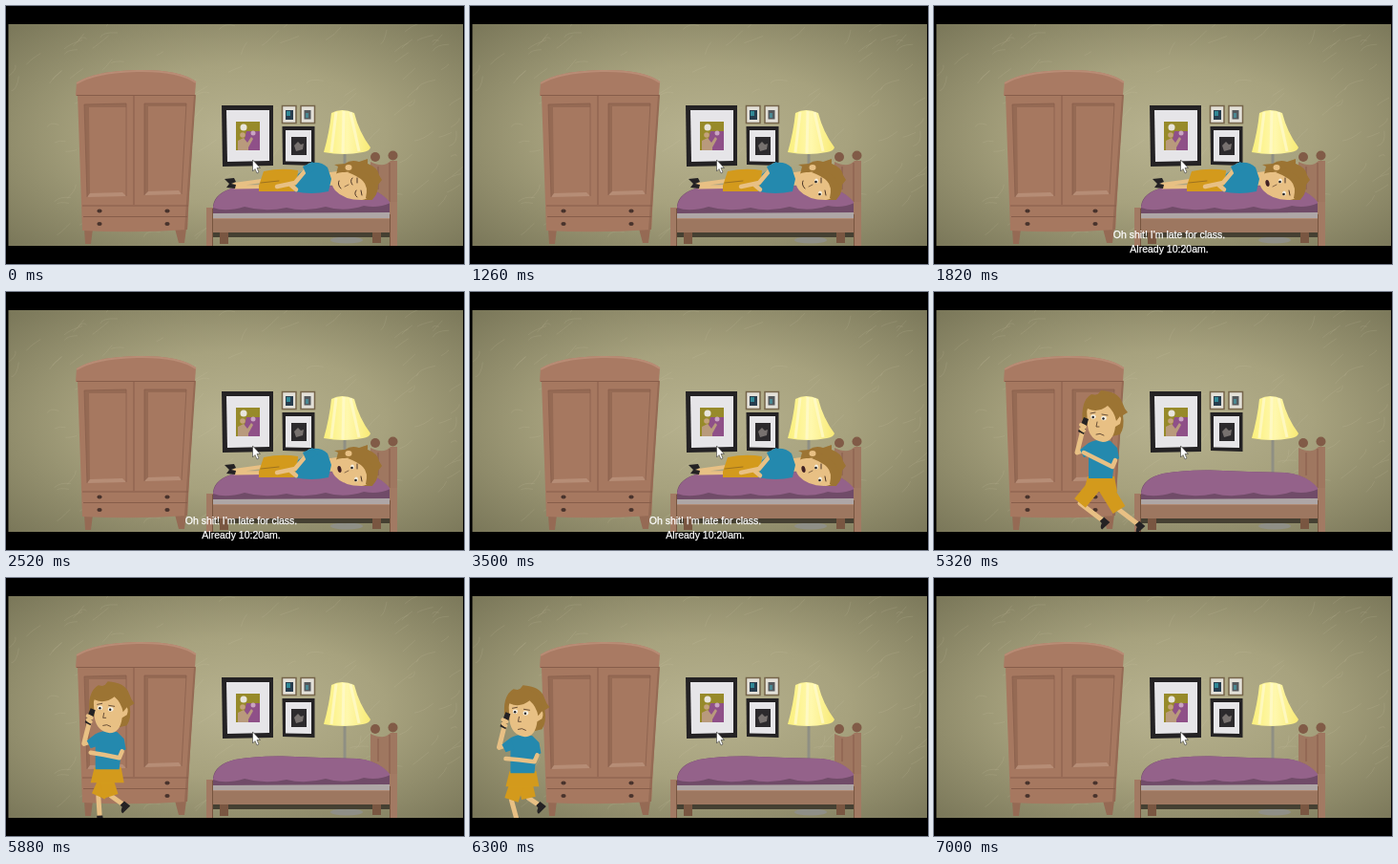
Recreate the animation shown at these times as an HTML page. Size 480 by 270 pixels, loop 7140 ms.

```html
<!DOCTYPE html>
<html lang="en">
<head>
<meta charset="utf-8">
<title>Late for class</title>
<style>
html, body { margin: 0; width: 100%; height: 100%; overflow: hidden; background: #000; }
svg { display: block; width: 100vw; height: 100vh; }
text { font: 10.5px "Liberation Sans", Arial, sans-serif; fill: #fff; stroke: #fff; stroke-width: .25; text-anchor: middle; }
.skin { fill: #e8c084; }
.hair { fill: #9c7433; }
.shirt { fill: #2489ae; }
.shorts { fill: #d39a1c; }
.ink { fill: #242224; }
.line { fill: none; stroke: #4b3527; stroke-width: 1; stroke-linecap: round; }
.limb { fill: none; stroke: #e8c084; stroke-linecap: round; stroke-linejoin: round; }
.wood { fill: #a67860; }
.groove { fill: none; stroke: #875d4a; stroke-width: 1; }
.shade { fill: #956a54; }
.bevel { fill: #b68d76; }
</style>
</head>
<body>
<svg viewBox="0 0 480 270">
  <defs>
    <radialGradient id="wall" cx=".51" cy=".5" r=".7">
      <stop offset="0" stop-color="#b7b28f"/>
      <stop offset=".45" stop-color="#a7a27e"/>
      <stop offset="1" stop-color="#7b785a"/>
    </radialGradient>
    <linearGradient id="glow" x1="0" x2="1">
      <stop offset="0" stop-color="#fbf07c"/>
      <stop offset=".5" stop-color="#fff8ad"/>
      <stop offset="1" stop-color="#f8ea76"/>
    </linearGradient>
    <clipPath id="view"><rect x="2.500" y="19" width="476.500" height="232"/></clipPath>
  </defs>
  <rect width="480" height="270"/>
  <g clip-path="url(#view)">
    <rect x="2" y="19" width="478" height="233" fill="url(#wall)"/>
    <g id="scratches" fill="none" stroke="#d4cfae" opacity=".13"></g>

    <!-- wardrobe -->
    <path class="shade" d="M82 233H91L89 249H83ZM177 233H189L187 248H181Z"/>
    <path class="wood" d="M75 93H198L190 234Q136 238 80 235Z"/>
    <path class="shade" d="M197 93H199L191 211L190 234H187Z"/>
    <path d="M73 94L74 80Q94 68 137 67Q181 66 199 79L198 94Z" fill="#a97a63"/>
    <path d="M74 81Q94 69 137 68Q181 67 199 80" fill="none" stroke="#b98c75" stroke-width="2"/>
    <path class="groove" d="M74 93.500H198M134 94V208M80 209H191M81 220.500H190"/>
    <path class="shade" d="M82 103L126 102V106H87L88 197L85 200ZM145 102L189 102V105H149V196L145 198Z"/>
    <path class="bevel" d="M85 200L88 196L122 195L126 199ZM145 198L149 194L181 193L184 197Z"/>
    <path class="groove" d="M85 200L82 103L126 102V199M145 198V102H189L184 197" stroke-opacity=".7"/>
    <g fill="#48332c">
      <ellipse cx="98" cy="214.500" rx="2.600" ry="2"/><ellipse cx="169" cy="214.500" rx="2.600" ry="2"/>
      <ellipse cx="98" cy="228" rx="2.600" ry="2"/><ellipse cx="169" cy="228" rx="2.600" ry="2"/>
    </g>

    <!-- framed pictures -->
    <path class="ink" d="M226 104H280V167L227 168Z"/>
    <path d="M231 109H276V162L232 163Z" fill="#e6e5e8"/>
    <rect x="241" y="121" width="25" height="30" fill="#978a2a"/>
    <path d="M252 131H266V151H247Z" fill="#8f5088"/>
    <path d="M243 151V141L249 138L253 143L257 137L259 139L254 148V151Z" fill="#b99a7c"/>
    <circle cx="248" cy="135" r="2.800" fill="#c4a27a"/>
    <circle cx="249" cy="127" r="3.500" fill="#e8e5dc"/><circle cx="259" cy="133" r="2.500" fill="#c9a3c2"/>
    <g fill="#e3e0d8" stroke="#75644a" stroke-width="1.500">
      <rect x="289.500" y="104.500" width="14.500" height="18"/><rect x="309" y="104.500" width="14.500" height="18"/>
    </g>
    <rect x="293" y="109" width="8" height="10" fill="#283d4e"/><path d="M294 110H298V115H294Z" fill="#318795"/>
    <rect x="312.500" y="109" width="7" height="9.500" fill="#54585c"/><path d="M314 112H317V117H314Z" fill="#4b8792"/>
    <path class="ink" d="M289.500 126H323.500V167L290 166Z"/>
    <path d="M293 130H320V163L293 162.500Z" fill="#e6e5e8"/>
    <rect x="299" y="137" width="16" height="19" fill="#2c2a2d"/>
    <path d="M302 146L306 142L309 145L312 144L311 150L304 152Z" fill="#77716f"/>

    <!-- lamp -->
    <ellipse cx="357" cy="245" rx="17" ry="3.500" fill="#8f8f87"/>
    <path d="M355 151V244" stroke="#8f8f83" stroke-width="3"/>
    <path d="M341 112Q352 106 365 112Q370 132 382 148Q381 152 374 153Q354 157 333 153Q339 132 341 112Z" fill="url(#glow)"/>
    <path d="M346 111L341 153M354 110L353 154M361 111L370 152" fill="none" stroke="#fffbd0" stroke-width="3" opacity=".7"/>

    <!-- bed -->
    <path d="M217 236H403V242H217Z" fill="#454032"/>
    <path d="M224 236H233V249H224ZM384 236H393V248H384Z" fill="#795641"/>
    <path d="M382 163Q396 170 403 162H410V220H382Z" fill="#9f7760"/>
    <path class="groove" d="M390 168V192M402 164V220"/>
    <circle cx="387" cy="158" r="5" fill="#815b47"/><circle cx="405.500" cy="156.500" r="5" fill="#815b47"/>
    <path d="M216 216H403V222H216Z" fill="#aea6a6"/>
    <path d="M217 217V209Q219 195 240 190Q262 186 290 186.500Q330 188 368 189Q391 191 403 207V216Z" fill="#704b68"/>
    <path d="M217 211Q219 195 240 190Q262 186 290 186.500Q330 188 368 189Q391 191 403 206Q390 212 375 209Q354 216 335 210Q313 216 294 211Q271 216 250 210Q230 216 217 211Z" fill="#94628a"/>
    <path d="M213 222H404V237H213Z" fill="#9d7760"/>
    <path d="M214 222.500H403" stroke="#b08a73"/>
    <path d="M210 211H217V251H210ZM402 205H410V251H402Z" fill="#a27a63"/>
    <path d="M216.500 212V251M402.500 218V251" stroke="#77553f"/>

    <g id="sleeper">
      <path class="limb" stroke-width="4" d="M239 187L268 183M240 189.500L270 189"/>
      <path class="ink" d="M229 181L239 180L241 184L236 186L241 187L240 191L231 190L234 186Z"/>
      <path class="shorts" d="M270 173Q288 169 306 172L304 194L265 194L265 188Z"/>
      <path class="line" d="M267 185L286 183" opacity=".4"/>
      <path class="skin" d="M333 175L347 173L346 187L335 188Z"/>
      <path class="shirt" d="M306 176L321 164Q331 163 337 169L341 181L338 194Q320 198 302 194Z"/>
      <path class="limb" stroke-width="4.500" d="M318 167L303 185L284 189M298 187L304 192"/>
      <path class="shirt" d="M311 168L321 163L327 170L315 177Z"/>
      <path class="hair" d="M346 176L348 168L344 166L355 165Q362 160 370 163L379 160L379 165Q390 169 391 177L394 182L390 187Q390 198 383 203L374 203L360 182Z"/>
      <path class="skin" d="M342 180Q345 173 355 174L369 172Q379 178 381 190Q383 202 373 203Q354 203 345 193Q340 187 342 180Z"/>
      <path class="hair" d="M358 174L368 169L381 178L389 190L384 203L377 201Q380 189 374 183Q369 178 358 174Z"/>
      <ellipse class="skin" cx="359" cy="169" rx="3.500" ry="3"/>
      <path class="line" d="M355 189L359 187" opacity=".65"/>
      <path class="line" d="M368 180L368 185M372 193L373 198"/>
      <g id="shut"><path class="line" d="M363 180Q360 183 363 187M367 193Q364 197 368 200"/></g>
      <g id="open">
        <ellipse cx="363" cy="183" rx="1.900" ry="2.600" fill="#f5f1e5"/><ellipse cx="367" cy="196" rx="1.900" ry="2.600" fill="#f5f1e5"/>
        <circle class="ink" cx="362.500" cy="184" r="1.300"/><circle class="ink" cx="366.500" cy="197" r="1.300"/>
      </g>
      <path id="lips" class="line" d="M349 183Q347 187 351 191"/>
      <ellipse id="talk" cx="349.500" cy="185.500" rx="2" ry="3.500" fill="#402024" transform="rotate(-12 349.500 185.500)"/>
    </g>

    <g id="walker">
      <g id="backLeg"></g>
      <g id="frontLeg"></g>
      <path class="shorts" d="M-14 193H14L17 209H-18Z"/>
      <path class="limb" stroke-width="5" d="M-10 163L-25 168L-19 144"/>
      <path class="shirt" d="M-13 158Q-2 152 10 156L17 163L19 174L14 177L12 195H-13Z"/>
      <path class="shirt" d="M-13 158L-22 165L-18 173L-9 170Z"/>
      <path id="forearm" class="limb" stroke-width="4.500"/>
      <path class="hair" d="M-19 138Q-22 114 -10 107L-4 108L0 103Q18 104 22 115L25 122L28 126L23 129Q25 142 20 149L8 152L-12 140Z"/>
      <path class="skin" d="M-15 122Q-3 112 12 121L17 128Q23 130 20 138L15 141Q13 157 2 157Q-12 155 -14 140Z"/>
      <path class="hair" d="M-18 134Q-20 110 0 106Q19 108 20 130L16 135Q14 125 7 119Q-3 127 -14 122Z"/>
      <ellipse cx="-8" cy="130.500" rx="2.600" ry="2.300" fill="#f5f1e5"/><ellipse cx="3" cy="132" rx="2.800" ry="2.300" fill="#f5f1e5"/>
      <circle class="ink" cx="-8.300" cy="131" r="1.200"/><circle class="ink" cx="2.500" cy="132.500" r="1.200"/>
      <path class="line" d="M-11 127L-6 126M1 128L7 129M-4 136L-5 141L-2 141M-5 149Q-1 147 3 150" opacity=".8"/>
      <path class="ink" d="M-18 131L-13 133L-18 149L-24 146Z"/>
      <path class="limb" stroke-width="4" d="M-21 139L-17 141M-21 143L-18 145"/>
    </g>

    <path d="M258.500 161V173L261 170.500L263 175L265 174L263 169.500H266.500Z" fill="#fff" stroke="#3a3a38" stroke-width=".6"/>
  </g>
  <g id="caption"><text x="246.500" y="243">Oh shit! I'm late for class.</text><text x="246.500" y="258">Already 10:20am.</text></g>
</svg>
<script>
const STEP = 140, LOOP = 7140;
const WAKE = 840, SPEAK = 1820, WALK = 4900, STRIDE = 754;
const el = id => document.getElementById(id);
const show = (id, on) => el(id).style.display = on ? '' : 'none';

// phase, knee x/y, foot x/y, measured from the hip
const gait = [
  [0, -18, 22, 7, 41],
  [.16, -15, 24, -20, 49],
  [.3, -8, 24, -2, 46],
  [.5, 18, 29, 39, 45],
  [.65, 12, 27, 28, 39],
  [.8, 5, 22, 17, 30],
  [1, -18, 22, 7, 41]
];

function limbAt(phase) {
  const p = (phase % 1 + 1) % 1;
  const i = gait.findIndex(key => key[0] > p);
  const a = gait[i - 1], b = gait[i];
  const k = (p - a[0]) / (b[0] - a[0]);
  return a.slice(1).map((v, n) => v + (b[n + 1] - v) * k);
}

function drawLeg(id, phase, hipX) {
  const hipY = 199;
  const [kx, ky, fx, fy] = limbAt(phase);
  const x = hipX + kx, y = hipY + ky, footX = hipX + fx, footY = hipY + fy;
  const tilt = Math.atan2(fy - ky, fx - kx) * 180 / Math.PI - 90;
  el(id).innerHTML =
    `<path class="limb" stroke-width="5" d="M${x} ${y}L${footX} ${footY}"/>
     <path d="M${hipX} ${hipY}L${x} ${y}" stroke="#d39a1c" stroke-width="15"/>
     <path class="ink" transform="translate(${footX} ${footY}) rotate(${tilt * .8})" d="M-3 -3H3L4 5H-7Q-8 2 -3 0Z"/>`;
}

function drawForearm(phase) {
  const handY = 177 - 9 * Math.cos(phase * 2 * Math.PI);
  el('forearm').setAttribute('d', `M15 176L12 183L-4 ${(handY + 182) / 2}L-18 ${handY}`);
}

function scratchWall() {
  let seed = 17;
  const rnd = () => (seed = seed * 16807 % 2147483647) / 2147483647;
  let d = '';
  for (let i = 0; i < 110; i++) {
    const x = 3 + rnd() * 470, y = 20 + rnd() * 225;
    d += `M${x} ${y}q${rnd() * 10} ${-rnd() * 8} ${6 + rnd() * 14} ${-rnd() * 16}`;
  }
  el('scratches').innerHTML = `<path d="${d}"/>`;
}

function draw(t) {
  const walking = t >= WALK;
  const speaking = t >= SPEAK && !walking;
  const mouthOpen = speaking && t / STEP % 4 < 3;
  show('sleeper', !walking);
  show('walker', walking);
  show('caption', speaking);
  show('shut', t < WAKE);
  show('open', t >= WAKE);
  show('talk', mouthOpen);
  show('lips', !mouthOpen);
  if (!walking) return;
  const since = t - 5320;
  const x = 175 - since * .122, y = since * .0095;
  const phase = since / STRIDE;
  el('walker').setAttribute('transform', `translate(${x} ${y})`);
  drawLeg('frontLeg', phase, -4);
  drawLeg('backLeg', phase + .5, 1);
  drawForearm(phase);
}

let last = -1;
function tick(now) {
  const t = Math.floor(now % LOOP / STEP) * STEP;
  if (t !== last) draw(last = t);
  requestAnimationFrame(tick);
}

scratchWall();
tick(performance.now());
</script>
</body>
</html>
```
